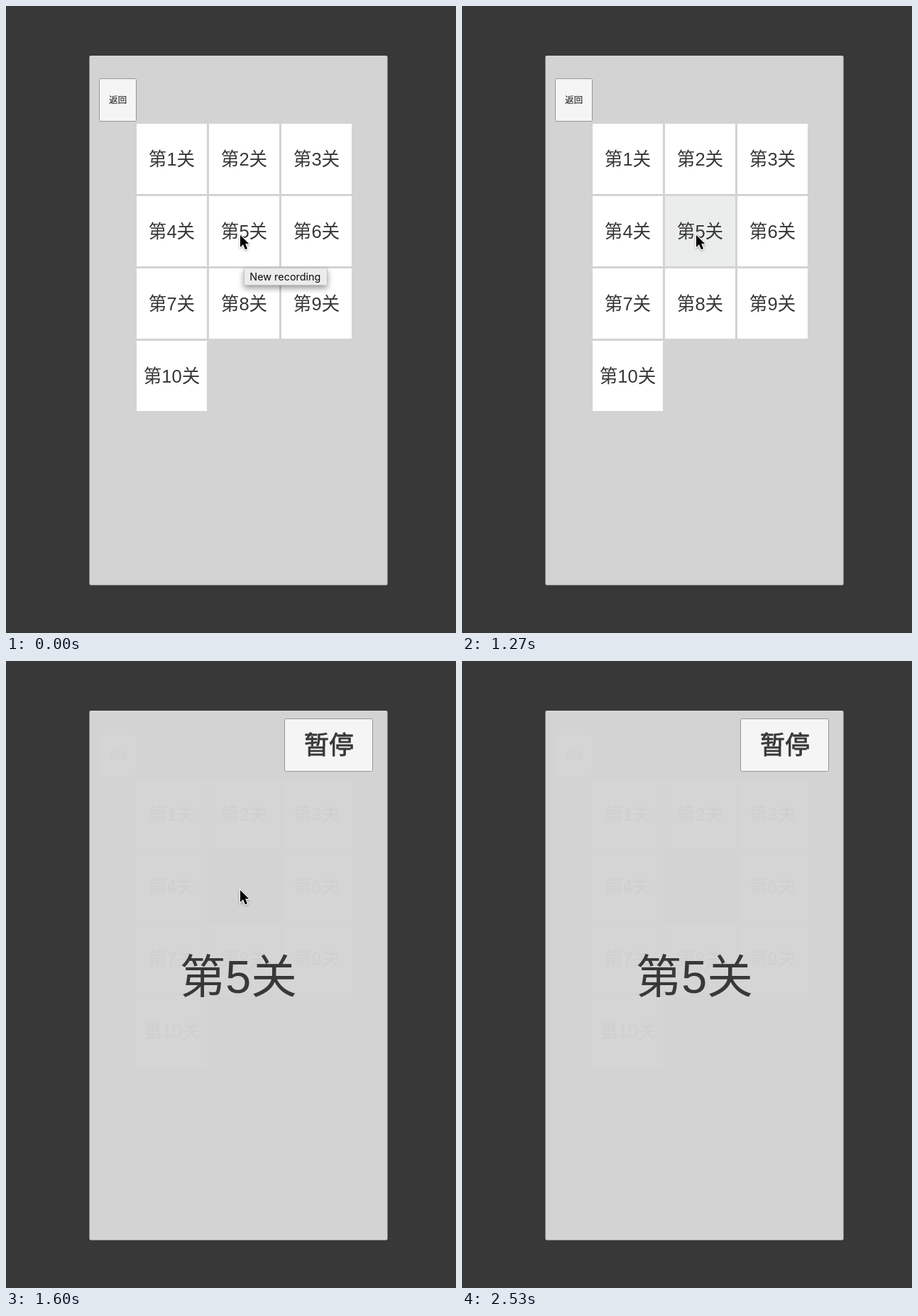
An HTML page with a canvas that plays this animation: 634x884 px, repeating every 3.07 s.

```html
<!DOCTYPE html>
<html lang="zh-CN">
<head>
<meta charset="utf-8">
<style>
html, body { margin: 0; width: 100%; height: 100%; overflow: hidden; background: #383838; }
canvas { display: block; }
</style>
</head>
<body>
<canvas id="stage" width="634" height="884"></canvas>
<script>
const ctx = document.getElementById('stage').getContext('2d');
const LOOP = 3070, FPS = 15;
const HAN = '"Liberation Sans", "Noto Sans CJK SC", "Noto Sans CJK", sans-serif';
const PANEL = 211, INK = 56;

// Pointer tip, one point per tick starting at MOVE
const MOVE = 26;
const PATH = [[330, 322], [365, 321], [410, 322], [395, 358], [330, 403], [265, 419],
  [290, 380], [355, 305], [430, 215], [500, 130], [565, 55], [617, 1]];

const gray = v => `rgb(${v},${v},${v})`;
const fade = (v, a) => gray(Math.round(PANEL + (v - PANEL) * a));

function box(x, y, w, h, r, fill, edge) {
  ctx.beginPath();
  ctx.roundRect(x, y, w, h, r);
  ctx.fillStyle = fill;
  ctx.fill();
  if (edge) {
    ctx.strokeStyle = edge;
    ctx.lineWidth = 1;
    ctx.stroke();
  }
}

function label(str, x, y, size, color, weight = 0, family = HAN) {
  ctx.font = `${size}px ${family}`;
  ctx.textAlign = 'center';
  ctx.fillStyle = ctx.strokeStyle = color;
  ctx.fillText(str, x, y);
  if (weight) {
    ctx.lineWidth = weight;
    ctx.strokeText(str, x, y);
  }
}

function drawMenu(tick) {
  const step = Math.max(0, Math.min(tick - 21, 3));
  const a = [1, .37, .13, .055][step];
  const inkA = [1, .37, .1, .025][step];
  const ink = fade(INK, inkA);
  box(131.5, 102.5, 52, 60, 2, fade(245, a), fade(150, inkA));
  label('返回', 157.7, 137, 12.4, ink, .25);
  for (let i = 0; i < 10; i++) {
    const x = 184 + i % 3 * 102, y = 166 + Math.floor(i / 3) * 102;
    const pressed = i === 4 && tick >= 19;
    const fill = !pressed ? fade(255, a) : tick === 19 ? '#ebeded' : fade(204, a);
    box(x, y, 99, 99, 0, fill);
    if (!(pressed && step === 3)) label(`第${i + 1}关`, x + 49.5, y + 59, 25.6, ink);
  }
}

function drawTooltip(alpha) {
  ctx.save();
  ctx.globalAlpha = alpha;
  ctx.shadowColor = 'rgba(0,0,0,.4)';
  ctx.shadowBlur = 9;
  ctx.shadowOffsetY = 4;
  box(335, 369.5, 118, 24.5, 1, '#ececec');
  ctx.shadowColor = 'transparent';
  box(335.5, 369.5, 117, 24, 1, '#ececec', '#c4c4c4');
  label('New recording', 393.3, 387, 14.4, '#0c0c0c', 0, 'Inter, sans-serif');
  ctx.restore();
}

function drawPointer(x, y) {
  ctx.save();
  ctx.translate(x, y);
  ctx.beginPath();
  [[0, 1], [0, 18], [4, 14.3], [7, 21.3], [10, 20], [7.2, 13.3], [12.3, 13.3]]
    .forEach(p => ctx.lineTo(...p));
  ctx.closePath();
  ctx.shadowColor = 'rgba(0,0,0,.35)';
  ctx.shadowBlur = 3;
  ctx.shadowOffsetY = 1;
  ctx.strokeStyle = '#fff';
  ctx.lineWidth = 2.2;
  ctx.stroke();
  ctx.shadowColor = 'transparent';
  ctx.fillStyle = '#000';
  ctx.fill();
  ctx.restore();
}

function draw(now) {
  const tick = Math.floor(now % LOOP * FPS / 1000 + .1);
  ctx.fillStyle = '#383838';
  ctx.fillRect(0, 0, 634, 884);
  box(117.5, 70, 420, 746.5, 2, gray(PANEL));
  drawMenu(tick);
  if (tick >= 22) {
    box(392.5, 81.5, 124, 74, 2, '#f5f5f5', '#969696');
    label('暂停', 455, 131, 35, gray(INK), .8);
    label('第5关', 327.3, 467.5, 64.6, gray(INK));
  }
  if (tick < 6) drawTooltip(tick < 1 ? 1 : .88);
  const point = PATH[Math.max(0, tick - MOVE)];
  if (point) drawPointer(...point);
}

const start = performance.now();
function loop() {
  draw(performance.now() - start);
  requestAnimationFrame(loop);
}
loop();
</script>
</body>
</html>
```
